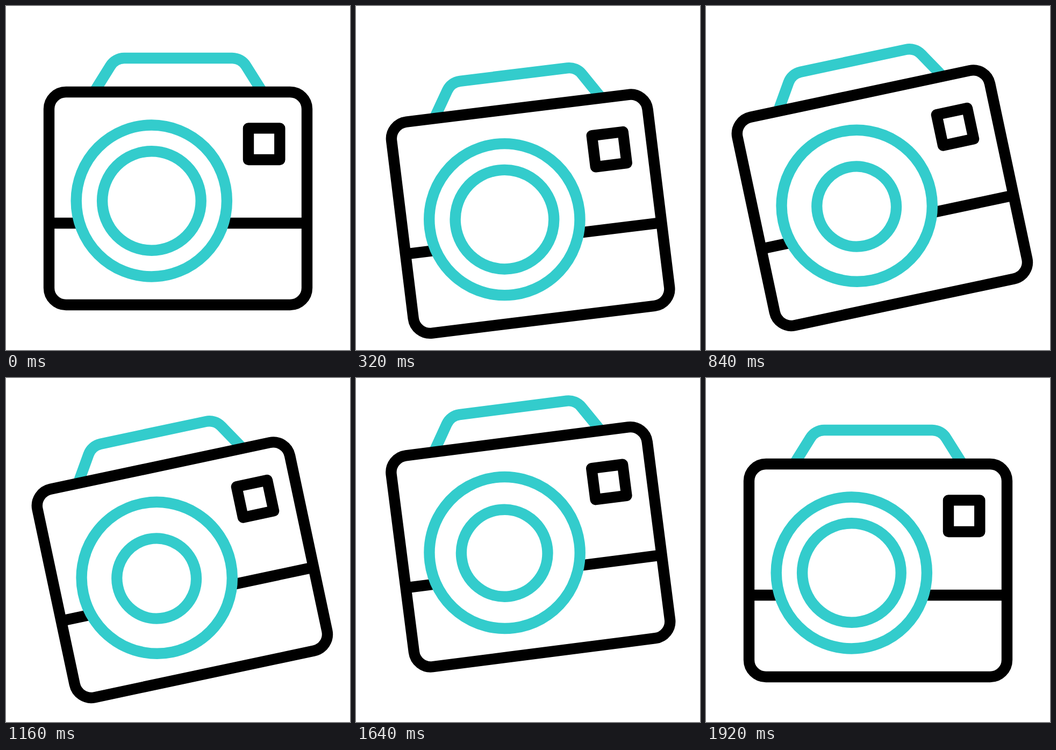
An HTML page that plays this animation: 640 px wide and 640 px high, repeating every 2 s.

```html
<!DOCTYPE html>
<html lang="en">
<head>
<meta charset="utf-8">
<title>Camera</title>
<style>
  html, body { margin: 0; width: 100%; height: 100%; overflow: hidden; background: #fff; }
  svg { display: block; width: 100%; height: 100%; }
  .ink, .teal { fill: none; stroke-width: 20.4; stroke-linejoin: round; }
  .ink { stroke: #000; }
  .teal { stroke: #33cccc; }
  .lens { fill: #fff; }
</style>
</head>
<body>
<svg viewBox="0 0 640 640">
  <g id="camera">
    <path class="teal" d="M164 160 L194.2 111.5 A30.5 30.5 0 0 1 220 97 H421 A30.5 30.5 0 0 1 446.6 111.5 L477 160"/>
    <rect class="ink" x="80" y="160" width="480" height="396" rx="31.5"/>
    <path class="ink" d="M80 404 H560"/>
    <rect class="ink" x="451" y="227.4" width="58.3" height="58.6"/>
    <ellipse class="teal lens" cx="270.8" cy="362.5" rx="140.1" ry="141"/>
    <ellipse class="teal" id="iris"/>
  </g>
</svg>
<script>
  const LOOP = 2000, STEP = 40;
  const camera = document.getElementById('camera');
  const iris = document.getElementById('iris');

  const ease = (t, from, to) => {
    const x = Math.min(1, Math.max(0, (t - from) / (to - from)));
    return x * x * (3 - 2 * x);
  };
  // rises from 0 to 1 and falls back, eased on both halves
  const hop = (t, from, to) => {
    const mid = (from + to) / 2;
    return ease(t, from, mid) - ease(t, mid, to);
  };

  function draw(t) {
    let tilt = ease(t, 120, 480);
    let lift = 30 * hop(t, 120, 480);
    let shut = ease(t, 480, 680);
    if (t > 1500) {
      tilt -= ease(t, 1456, 1886);
      lift -= 46 * hop(t, 1456, 1886);
      shut -= ease(t, 1460, 1905);
    }
    camera.setAttribute('transform',
      `translate(0 ${lift}) rotate(${-12 * tilt} 320 320)`);
    const shape = {
      cx: 270.9 - 0.9 * shut,
      cy: 362.5 + 1.1 * shut,
      rx: 91.8 - 18 * shut,
      ry: 92.3 - 17.7 * shut
    };
    for (const key in shape) iris.setAttribute(key, shape[key]);
  }

  const start = performance.now();
  function tick() {
    const t = (performance.now() - start) % LOOP;
    draw(Math.floor(t / STEP) * STEP);
    requestAnimationFrame(tick);
  }
  tick();
</script>
</body>
</html>
```
